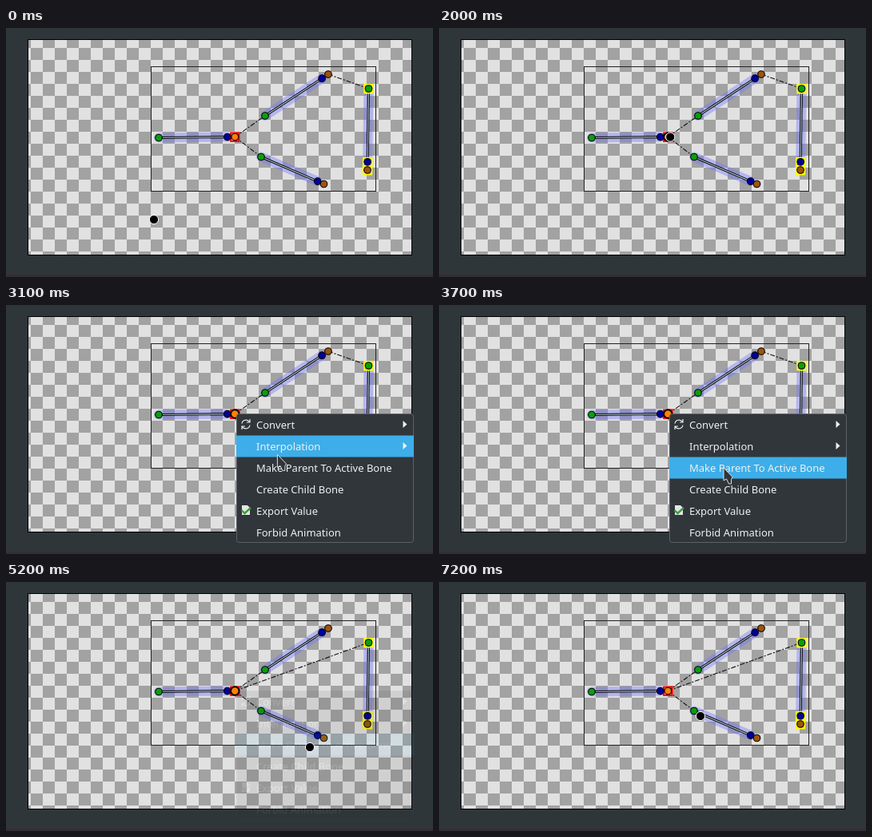
Animation, 534 px wide and 312 px high, one loop 8000 ms. Source, as an HTML page:

```html
<!DOCTYPE html>
<html lang="en">
<head>
<meta charset="utf-8">
<title>Re-parenting a bone</title>
<style>
  html, body { margin: 0; width: 100%; height: 100%; overflow: hidden; background: #2f3639; }
  svg { display: block; width: 534px; height: 312px; }
  .glow { stroke: rgba(116, 116, 255, .4); stroke-width: 12; stroke-linecap: round; }
  .edge { stroke: #000; stroke-width: 3.1; }
  .core { stroke: #a8c0c6; stroke-width: 1.2; }
  .link { stroke: #111; stroke-width: 1.1; stroke-dasharray: 6 2 2 2; }
  .knob { stroke: #000; stroke-width: 1.1; }
  .mark { fill: none; stroke-width: 2; }
  .menu text { font: 13px "Noto Sans", "Open Sans", sans-serif; fill: #eff0f1; }
</style>
</head>
<body>
<svg viewBox="0 0 534 312">
  <defs>
    <pattern id="check" x="31" y="25" width="30" height="30" patternUnits="userSpaceOnUse">
      <path fill="#e1e1e1" d="M0 0h30v30H0z"/>
      <path fill="#a2a2a2" d="M0 0h15v15H0zM15 15h15v15H15z"/>
    </pattern>
  </defs>
  <path fill="#2f3639" d="M0 0h534v312H0z"/>
  <path fill="#342f34" d="M0 309h534v3H0z"/>
  <rect x="27.5" y="14.5" width="480" height="270" fill="url(#check)" stroke="#000"/>
  <rect x="181.5" y="48.5" width="281" height="156" fill="none" stroke="#222"/>
  <g id="rig"></g>

  <g class="menu" id="menu">
    <rect x="288.5" y="136.5" width="221" height="161" rx="3" fill="#31363b" stroke="#5c6165"/>
    <rect id="row" x="288" width="222" height="27" fill="#3daee9"/>
    <g id="labels"></g>
    <path fill="#eff0f1" d="M496.5 145l5 4.5-5 4.5zM496.5 172l5 4.5-5 4.5z"/>
    <path fill="none" stroke="#eff0f1" stroke-width="1.2"
          d="M295 148.5a5.2 5.2 0 0 1 9.5-2M305 143v4h-4M305 150.5a5.2 5.2 0 0 1-9.5 2M295 156v-4h4"/>
    <path fill="#e4e6e4" d="M295 251h7l3 3v9h-10z"/>
    <path fill="none" stroke="#3f9a3f" stroke-width="2.4" d="M294.5 257l4 4 7.5-7"/>
  </g>

  <circle id="dot" r="5.6" stroke="#fff"/>
  <path id="arrow" fill="#30353a" stroke="#eff0f1" stroke-width=".9"
        d="M.5 .5V16.5L4 14.5L7 20.5H10V15L11.5 12z"/>
</svg>
<script>
const LOOP = 8000, STEP = 100;
const MENU_OPEN = 2400, PICK = 5000;
const $ = id => document.getElementById(id);
const set = (id, attrs) => {
  for (const key in attrs) $(id).setAttribute(key, attrs[key]);
};
const clamp = (v, lo, hi) => Math.max(lo, Math.min(hi, v));
const ramp = (t, from, to) => clamp((t - from) / (to - from), 0, 1);
const mix = (a, b, f) => a + (b - a) * f;

// A bone runs from root to end; its tip sits at nine tenths of the way.
const bone = (x, y, u, v) =>
  ({ root: [x, y], end: [u, v], tip: [mix(x, u, .9), mix(y, v, .9)] });
const base = bone(191, 137.5, 286.3, 136.5);
const upper = bone(324, 110, 403, 58);
const lower = bone(319, 161.5, 397.5, 195.5);
const side = bone(453.5, 76, 452, 178);
const bones = [base, upper, lower, side];

const line = (a, b) => `M${a}L${b}`;
const knob = ([x, y], fill, id = '') =>
  `<circle class="knob" id="${id}" cx="${x}" cy="${y}" r="4.3" fill="${fill}"/>`;
const mark = ([x, y], color) =>
  `<rect class="mark" x="${x - 5.2}" y="${y - 5}" width="10.4" height="10.4" stroke="${color}"/>`;

$('rig').innerHTML = [
  ...bones.flatMap(b => ['glow', 'edge', 'core'].map(c =>
    `<path class="${c}" d="${line(b.root, b.tip)}"/>`)),
  `<path class="link" d="${line(base.end, upper.root)}${line(base.end, lower.root)}"/>`,
  '<path class="link" id="moved"/>',
  ...[side.root, side.tip, side.end].map(p => mark(p, '#ff0')),
  mark(base.end, '#f00'),
  ...bones.map(b => (b === base ? '' : knob(b.end, '#a0540a'))
    + knob(b.root, '#08a008') + knob(b.tip, '#00009c')),
  knob(base.end, '#ff8205', 'joint')
].join('');

const items = ['Convert', 'Interpolation', 'Make Parent To Active Bone',
  'Create Child Bone', 'Export Value', 'Forbid Animation'];
$('labels').innerHTML = items.map((s, i) =>
  `<text x="313" y="${155 + 27 * i}">${s}</text>`).join('');

// Pointer moves: when, where to, and how far the path bows out halfway.
const home = [185, 240];
const moves = [
  { from: 0, to: 900, at: [295, 193], bow: [210, -115] },
  { from: 900, to: 1500, at: [279, 144] },
  { from: 1700, to: 2100, at: [288, 136], bow: [8, 0] },
  { from: 2500, to: 3600, at: [356, 204] },
  { from: 4100, to: 4300, at: [380, 207], bow: [14, 8] },
  { from: 5900, to: 6300, at: [350, 229], bow: [-60, 0] },
  { from: 6300, to: 6800, at: [471, 16], bow: [75, 0] },
  { from: 6800, to: 7200, at: [327, 168] }
];

function pointer(t) {
  let pos = home;
  for (const { from, to, at, bow = [0, 0] } of moves) {
    if (t < from) break;
    const f = Math.sin(ramp(t, from, to) * Math.PI / 2);
    const arc = Math.sin(f * Math.PI);
    pos = pos.map((p, i) => mix(p, at[i], f) + bow[i] * arc);
  }
  return pos;
}

function draw(t) {
  const [x, y] = pointer(t);
  const menuOpen = t >= MENU_OPEN && t < PICK;
  const hot = (t >= 2000 && t < PICK + 400)
    || Math.hypot(x - base.end[0], y - base.end[1]) < 9;
  const item = clamp(Math.floor((y - 136) / 27), 0, items.length - 1);

  set('moved', { d: line(t < PICK ? upper.end : base.end, side.root) });
  set('joint', { r: hot ? 5.2 : 4.3, style: `stroke-width: ${hot ? 1.9 : 1.1}` });
  set('menu', { opacity: ramp(t, 2350, 2700) - ramp(t, 4900, 5230) });
  set('row', { y: 136.5 + 27 * item });
  set('dot', { cx: x, cy: y, visibility: menuOpen ? 'hidden' : 'visible' });
  set('arrow', {
    transform: `translate(${x - .5} ${y - .5})`,
    visibility: menuOpen ? 'visible' : 'hidden'
  });
}

const start = performance.now();
function tick() {
  const t = (performance.now() - start) % LOOP;
  draw(Math.floor(t / STEP) * STEP);
  requestAnimationFrame(tick);
}
tick();
</script>
</body>
</html>
```
